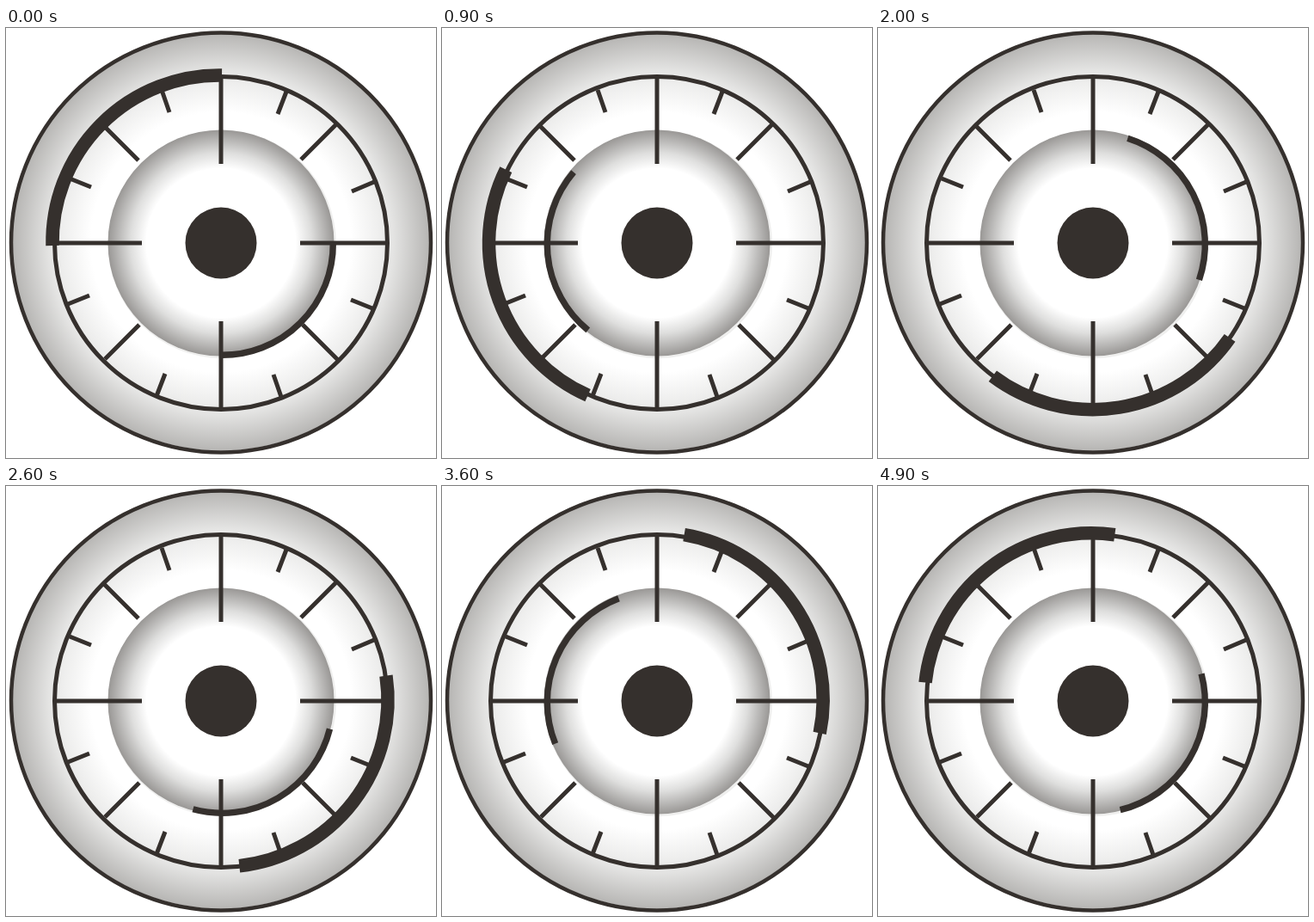
Write an HTML page that moves like this. It is 500 px wide and 500 px high and loops after 5000 ms.

```html
<!DOCTYPE html>
<html lang="en">
<head>
<meta charset="utf-8">
<title>Rotating dial</title>
<style>
  html, body { margin: 0; width: 100%; height: 100%; overflow: hidden; background: #fff; }
  svg { display: block; width: 100%; height: 100%; }
  .line { fill: none; stroke: #35302d; stroke-width: 5; }
</style>
</head>
<body>
<svg viewBox="0 0 500 500">
  <defs>
    <radialGradient id="rim" gradientUnits="userSpaceOnUse" cx="250" cy="249" r="244">
      <stop offset=".62" stop-color="#fff"/>
      <stop offset=".8" stop-color="#e9e9e8"/>
      <stop offset="1" stop-color="#b5b4b2"/>
    </radialGradient>
    <radialGradient id="hub" gradientUnits="userSpaceOnUse" cx="250" cy="250" r="131.5">
      <stop offset=".66" stop-color="#fff"/>
      <stop offset=".8" stop-color="#dededd"/>
      <stop offset="1" stop-color="#999795"/>
    </radialGradient>
  </defs>

  <circle cx="250" cy="248.5" r="243" fill="url(#rim)"/>
  <circle class="line" cx="250" cy="249.5" r="244" style="stroke-width:4.5"/>
  <circle cx="251.3" cy="251.3" r="132.7" fill="#efefee"/>
  <circle cx="250" cy="250" r="131.5" fill="url(#hub)"/>
  <circle class="line" cx="250" cy="250" r="193.5"/>

  <path class="line" d="M250 57V158M250 341V443M57 250H158M342 250H443
    M114 114L154 154M384 112L343 153M115 385L155 345M386 386L345 345
    M181 72L190 98M326 74L316 100M74 175L99 185M428 179L402 190
    M72 321L97 311M426 326L401 316M175 428L185 402M320 429L311 403"/>
  <circle cx="250" cy="250" r="41.5" fill="#35302d"/>

  <path id="outer" class="line" style="stroke-width:15.5" d="M251 55A194 194 0 0 0 54 253"/>
  <path id="inner" class="line" style="stroke-width:7.4" d="M380.3 250.4A129 129 0 0 1 249.5 380.3"/>
</svg>
<script>
  const LOOP = 5000, STEP = 100;
  const outer = document.getElementById('outer');
  const inner = document.getElementById('inner');
  const turn = (el, deg, c) => el.setAttribute('transform', `rotate(${deg} ${c} ${c})`);

  // The outer arc turns once per loop, the inner one twice the other way.
  function draw(now) {
    const angle = Math.floor(now % LOOP / STEP) * STEP / LOOP * 360;
    turn(outer, -angle, 249);
    turn(inner, 2 * angle, 251.3);
    requestAnimationFrame(draw);
  }
  draw(performance.now());
</script>
</body>
</html>
```
